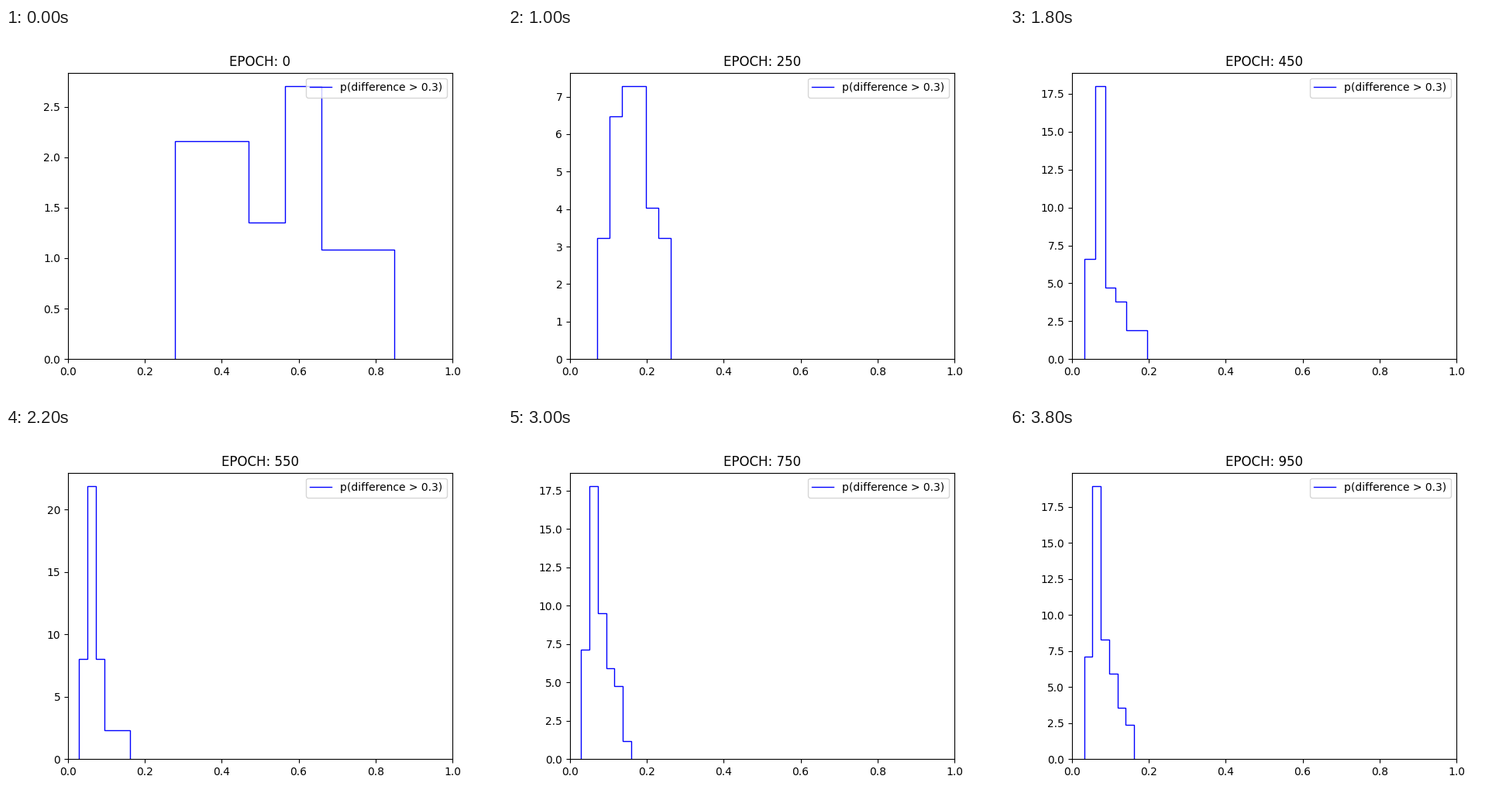
Recreate the animation shown at these times as a matplotlib script. Size 640 px wide and 480 px high, loop 4000 ms.

```python
import matplotlib.pyplot as plt
import numpy as np
from matplotlib.animation import FuncAnimation
from matplotlib.lines import Line2D

FRAMES = 20
BINS = 6
EPOCH_STEP = 50

# Key poses of the distribution: step -> (lowest, highest, samples per bin).
KEYS = {
    0: (0.2791, 0.8484, (8, 8, 5, 10, 4, 4)),
    3: (0.1042, 0.2942, (3, 5, 8, 10, 8, 5)),
    7: (0.0484, 0.2321, (5, 11, 8, 10, 1, 4)),
    9: (0.0325, 0.1949, (7, 19, 5, 4, 2, 2)),
    11: (0.0282, 0.1618, (7, 19, 7, 2, 2, 2)),
    15: (0.0290, 0.1587, (6, 15, 8, 5, 4, 1)),
    19: (0.0316, 0.1617, (6, 16, 7, 5, 3, 2)),
}


def spread(low, high, counts):
    """Sorted samples, evenly spaced inside each bin, spanning low to high."""
    pos = np.hstack([k + (np.arange(c) + 0.5) / c for k, c in enumerate(counts)])
    samples = low + (high - low) * pos / BINS
    samples[0], samples[-1] = low, high
    return samples


steps = list(KEYS)
log_paths = np.log([spread(*key) for key in KEYS.values()]).T


def samples_at(step):
    """Every sample decays exponentially from one key pose to the next."""
    return np.exp([np.interp(step, steps, path) for path in log_paths])


fig, ax = plt.subplots(figsize=(6.4, 4.8), dpi=100)
handle = Line2D([], [], color="blue", lw=1)


def draw(i):
    ax.clear()
    ax.hist(samples_at(i), bins=BINS, density=True,
            histtype="step", color="blue", lw=1)
    ax.set_xlim(0, 1)
    ax.set_title(f"EPOCH: {i * EPOCH_STEP}")
    ax.legend([handle], ["p(difference > 0.3)"], loc="upper right")
    return ax.get_children()


anim = FuncAnimation(fig, draw, frames=FRAMES, interval=200,
                     init_func=lambda: draw(0), repeat=True, repeat_delay=0)
plt.show()
```
